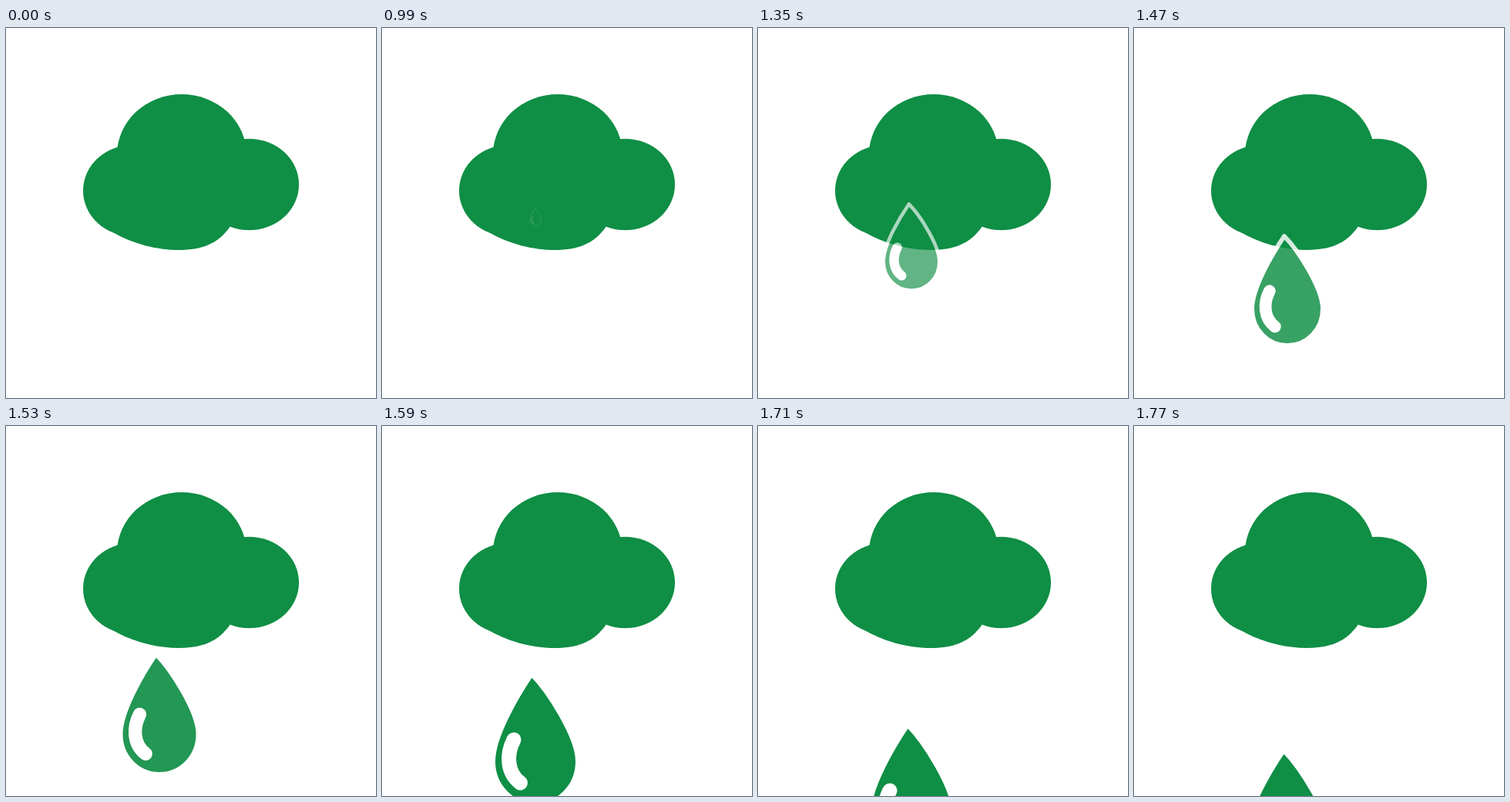
An HTML page for the animation above (1.83 s loop, 480 by 480 pixels).

```html
<!DOCTYPE html>
<html lang="en">
<head>
<meta charset="utf-8">
<title>Cloud and drop</title>
<style>
  html, body { margin: 0; height: 100%; overflow: hidden; background: #fff; }
  svg { display: block; width: 100vw; height: 100vh; fill: #0f8e45; }
  #drop path { stroke: #fff; stroke-linejoin: round; stroke-linecap: round; }
</style>
</head>
<body>
<svg viewBox="0 0 480 480">
  <g id="cloud">
    <ellipse cx="228" cy="164" rx="84" ry="78"/>
    <ellipse cx="164.5" cy="211" rx="64.5" ry="59.3"/>
    <ellipse cx="315.5" cy="203" rx="64.5" ry="59.3"/>
    <path d="M137 264C165 281 198 288 224 288C254 288 275 280 290.5 258V180H137Z"/>
  </g>
  <g id="drop">
    <path stroke-width="7" d="M-5-87C-22-62-55.5-7-55.5 27C-55.5 59-31 84.5 0 84.5S55.5 59 55.5 27C55.5-5 17-65-5-87Z"/>
    <path stroke-width="19" fill="none" d="M-28-1C-38 18-37 42-19.5 55"/>
  </g>
</svg>
<script>
  const LOOP = 1830, START = 990, STEP = 60;
  const GROW_STEPS = 10, EASE_STEPS = 8, EASE_DROP = 96, SPEED = 33;
  const drop = document.getElementById('drop');
  const begin = performance.now();

  // Eases in, then falls at a constant speed.
  const fall = k => k < EASE_STEPS
    ? EASE_DROP * (k / EASE_STEPS) ** 3.1
    : EASE_DROP + SPEED * (k - EASE_STEPS);

  function draw(now) {
    const time = Math.max(0, now - begin) % LOOP;
    const k = Math.floor((time - START) / STEP);
    if (k < 0) {
      drop.setAttribute('opacity', 0);
    } else {
      const size = (14 + 9 * Math.min(k, GROW_STEPS)) / 104;
      drop.setAttribute('opacity', size);
      drop.setAttribute('transform', `translate(199 ${246 + fall(k)}) scale(${size})`);
    }
    requestAnimationFrame(draw);
  }
  draw(begin);
</script>
</body>
</html>
```
